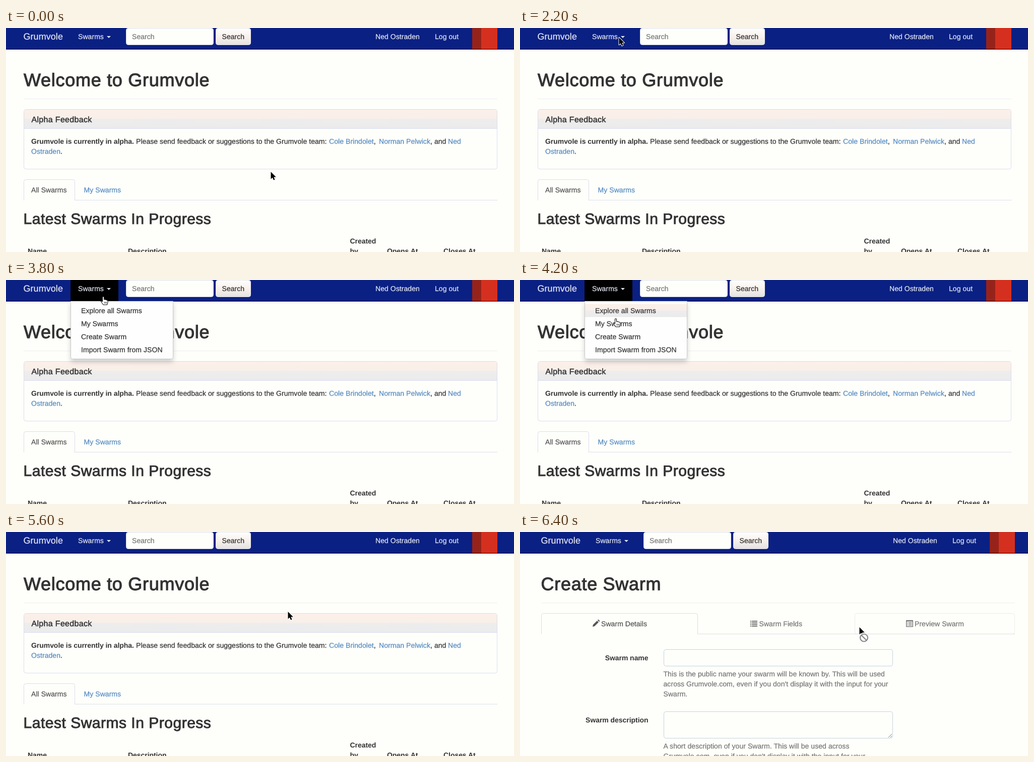
These frames come from a looping animation (1008 by 447 pixels, 8.4 s). An HTML page:

```html
<!DOCTYPE html>
<html lang="en">
<head>
<meta charset="utf-8">
<title>Creating a swarm</title>
<style>
  html, body { margin: 0; width: 100%; height: 100%; overflow: hidden; background: #fefffb; }
  svg { display: block; width: 1008px; height: 447px; }
  text {
    font: 14px "Liberation Sans", Arial, sans-serif; letter-spacing: .06px; white-space: pre;
    text-rendering: geometricPrecision;
    color: #333; fill: currentColor; stroke: currentColor; stroke-width: .25px;
  }
  tspan { fill: #333; stroke: #333; }
  .bold { font-weight: 700; letter-spacing: -.05px; stroke: none; }
  .h1 { font-size: 36px; stroke-width: 1.1px; letter-spacing: .02em; }
  .h2 { font-size: 30px; stroke-width: .95px; letter-spacing: .017em; }
  .h3 { font-size: 16px; stroke-width: .5px; letter-spacing: .02em; }
  .brand { font-size: 18px; color: #e2e5f1; }
  .nav { color: #e2e5f1; }
  .link { color: #578bc2; }
  .tab { color: #555; }
  .muted { color: #777; }
  .end { text-anchor: end; }
</style>
</head>
<body>
<svg id="stage" viewBox="0 0 1008 447" xmlns="http://www.w3.org/2000/svg"></svg>
<script>
const LOOP = 8400, STEP = 200;
const BRAND = "Grumvole", USER = ["Ned", "Ostraden"];
const PAGE = "#fefffb", EDGE = "#d9dcf0";

const text = (x, y, str, cls = "") => `<text x="${x}" y="${y}" class="${cls}">${str}</text>`;
const rect = (x, y, w, h, fill, extra = "") =>
  `<rect x="${x}" y="${y}" width="${w}" height="${h}" fill="${fill}" ${extra}/>`;
const box = (x, y, w, h, stroke, fill = PAGE) =>
  rect(x + .5, y + .5, w - 1, h - 1, fill, `rx="4" stroke="${stroke}"`);
const line = (x1, x2, y, color) => rect(x1, y, x2 - x1, 1, color);
const path = (d, extra) => `<path d="${d}" ${extra}/>`;
const tabShape = (x, y, w, h, color) =>
  path(`M${x + .5} ${y + h}V${y + 4.5}q0 -4 4 -4H${x + w - 4.5}q4 0 4 4V${y + h}`,
    `fill="${PAGE}" stroke="${color}"`);
const group = (id, content) => `<g id="${id}">${content}</g>`;

const defs = `<defs>
  <linearGradient id="head" x2="0" y2="1">
    <stop offset="0" stop-color="#fbf0e9"/><stop offset=".46" stop-color="#f9efe9"/>
    <stop offset=".52" stop-color="#eeedec"/><stop offset="1" stop-color="#ebebed"/>
  </linearGradient>
  <linearGradient id="button" x2="0" y2="1">
    <stop offset="0" stop-color="#fefefe"/><stop offset=".5" stop-color="#f8f1ec"/>
    <stop offset="1" stop-color="#e3e2e2"/>
  </linearGradient>
  <filter id="shadow" x="-10%" y="-10%" width="120%" height="130%">
    <feDropShadow dx="0" dy="6" stdDeviation="5" flood-opacity=".18"/>
  </filter>
</defs>`;

const navbar = rect(0, 0, 1008, 42, "#0a2083") + rect(0, 42, 1008, 1, "#000") +
  group("navItems",
    rect(128, 0, 95, 42, "#000", 'id="toggle"') +
    text(34.5, 23, BRAND, "brand") +
    text(143, 22, "Swarms", "nav") +
    path("M200 16h8l-4 4z", 'fill="#e2e5f1"') +
    box(238, 0, 174, 34, "#dcdfee") + text(250, 22, "Search", "muted") +
    box(416, 0, 70, 34, "#e9e7ea", "url(#button)") + text(428.5, 22, "Search") +
    text(733, 22, USER.join(" "), "nav") + text(851, 22, "Log out", "nav") +
    rect(925, 0, 50, 42, "#d5301f") + rect(925, 0, 18, 42, "#96231a"));

const home = group("home",
  text(35, 115.5, `Welcome to ${BRAND}`, "h1") +
  line(35, 975, 141, "#eeeeec") +
  box(35, 162, 940, 120, EDGE) +
  path("M36 200V166.5q0 -3.5 3.5 -3.5H970.5q3.5 0 3.5 3.5V200z", 'fill="url(#head)"') +
  line(36, 974, 200, EDGE) +
  text(50.5, 188, "Alpha Feedback", "h3") +
  text(50, 231, `${BRAND} is currently in alpha.`, "bold") +
  text(258, 231, `Please send feedback or suggestions to the ${BRAND} team:`) +
  text(641, 231, "Cole Brindolet<tspan>,</tspan>", "link") +
  text(740, 231, "Norman Pelwick<tspan>, and</tspan>", "link") +
  text(877, 231, USER[0], "link") +
  text(50, 251, `${USER[1]}<tspan>.</tspan>`, "link") +
  line(35, 975, 343, "#dddde6") +
  tabShape(35, 302, 102, 42, EDGE) +
  text(50, 328, "All Swarms", "tab") + text(154.5, 328, "My Swarms", "link") +
  text(34.5, 391, "Latest Swarms In Progress", "h2") +
  text(682.5, 430, "Created", "bold") +
  [[43, "Name"], [242, "Description"], [682.5, "by"], [756, "Opens At"], [868, "Closes At"]]
    .map(([x, s]) => text(x, 450, s, "bold")).join(""));

const pencil = path("M144 189l1 -4 8 -8 3 3 -8 8zM154 176l1.5 -1.5 3 3 -1.5 1.5z", 'fill="#555"');
const listIcon = Array.from({ length: 4 }, (_, i) => 177 + i * 3.3)
  .map(y => rect(457, y, 2, 2, "#777") + rect(460, y, 11, 2, "#777")).join("");
const sheetIcon = rect(766.7, 176.7, 12.6, 12, "none", 'stroke="#777" stroke-width="1.4"') +
  rect(766, 176, 14, 2.5, "#777") +
  [180, 182.7, 185.4].map(y => rect(768.5, y, 1.5, 1.3, "#777") + rect(771, y, 6.5, 1.3, "#777")).join("");

const domain = `${BRAND}.com, even if you don't display it with the input for your`;
const help = (y, lines) => lines.map((s, i) => text(284.5, y + 20 * i, s, "muted")).join("");
const create = group("create",
  text(41.5, 115.5, "Create Swarm", "h1") +
  line(42, 982, 141, "#eeeeec") +
  line(42, 982, 203, "#dddde6") +
  tabShape(42, 162, 311, 42, EDGE) +
  box(664, 162, 318, 42, "#ebebed") + line(664, 982, 203, "#dddde6") +
  pencil + text(161, 188, "Swarm Details", "tab") +
  listIcon + text(474.5, 188, "Swarm Fields", "muted") +
  sheetIcon + text(783, 188, "Preview Swarm", "muted") +
  text(254.5, 256, "Swarm name", "bold end") +
  box(285, 234, 455, 34, "#c3d3dc") +
  help(288, ["This is the public name your swarm will be known by. This will be used",
    `across ${domain}`, "Swarm."]) +
  text(254.5, 380, "Swarm description", "bold end") +
  box(285, 358, 455, 54, "#c3d3dc") +
  path("M731 410l7 -7M735 410l3 -3", 'stroke="#777" fill="none"') +
  help(432, ["A short description of your Swarm. This will be used across", domain]));

const menu = group("menu",
  path("M128.5 42.5H331.5V153.5q0 4 -4 4H132.5q-4 0 -4 -4z",
    'fill="#fefefe" stroke="#c9c9cb" filter="url(#shadow)"') +
  rect(129, 48, 202, 26, "url(#head)", 'id="hover"') +
  ["Explore all Swarms", "My Swarms", "Create Swarm", "Import Swarm from JSON"]
    .map((s, i) => text(149, 66 + 26 * i, s)).join(""));

const cursor = group("cursor",
  group("arrow", path("M-.5 0V14.5L2.8 11.4 5.1 16.5 7.5 15.4 5.3 10.4H9.8z",
    'fill="#000" stroke="#fff" stroke-width="2" stroke-linejoin="round" paint-order="stroke"')) +
  group("hand", path("M-1.5 9V1.5Q-1.5 0 0 0T1.5 1.5V6Q3 5 4.3 6.5 6 5.8 6.8 7.3 " +
    "9 7 9 9V11.5Q8.5 14 7.5 16.5H0Q-2 13.5 -4.6 10 -4.5 7.8 -1.5 10z",
    'fill="#fff" stroke="#111" stroke-width="1.1" stroke-linejoin="round"') +
    path("M2.2 10.5v3.5M4.3 10.5v3.5M6.3 10.5v3.5", 'stroke="#111" stroke-width=".8"')) +
  group("blocked", `<circle cx="8.5" cy="21" r="10" fill="#fff"/>
    <circle cx="8.5" cy="21" r="7.5" fill="#fafafa" stroke="#888" stroke-width="2.2"/>` +
    path("M3.4 16l10.2 10.2", 'stroke="#888" stroke-width="2.2"')));

document.getElementById("stage").innerHTML =
  defs + rect(0, 0, 1008, 447, PAGE) + home + create + navbar + menu + cursor;

const el = id => document.getElementById(id);
const show = (id, on) => el(id).setAttribute("display", on ? "inline" : "none");
const move = (id, x, y) => el(id).setAttribute("transform", `translate(${x} ${y})`);
const smooth = p => p * p * (3 - 2 * p);
const easeOut = p => 1 - (1 - p) ** 2;

// time, x, y, easing into the point
const track = [
  [0, 526, 287], [2200, 197, 19, smooth], [2800, 195, 18, smooth], [3400, 194, 18, smooth],
  [3600, 194, 18, smooth], [4200, 190, 77, smooth], [4600, 187, 106, easeOut],
  [4800, 187, 106, smooth], [5600, 560, 159, smooth], [6400, 674, 190, easeOut]
];

function pointer(t) {
  const i = track.findIndex(k => k[0] > t);
  if (i < 0) return track[track.length - 1].slice(1, 3);
  const [t0, x0, y0] = track[i - 1], [t1, x1, y1, ease] = track[i];
  const p = ease((t - t0) / (t1 - t0));
  return [x0 + (x1 - x0) * p, y0 + (y1 - y0) * p].map(Math.round);
}

function draw(time) {
  const t = Math.floor((time % LOOP) / STEP) * STEP;
  const created = t >= 6000, open = t >= 3800 && t < 5000, hand = t >= 2400 && t < 5000;
  show("home", !created);
  show("create", created);
  move("navItems", created ? 7 : 0, 0);
  show("menu", open);
  show("toggle", open);
  show("hover", t >= 4000);
  move("hover", 0, t >= 4600 ? 52 : t >= 4400 ? 26 : 0);
  show("arrow", !hand);
  show("hand", hand);
  show("blocked", t >= 6400);
  move("cursor", ...pointer(t));
}

const start = performance.now();
function tick() {
  draw(performance.now() - start);
  requestAnimationFrame(tick);
}
tick();
</script>
</body>
</html>
```
